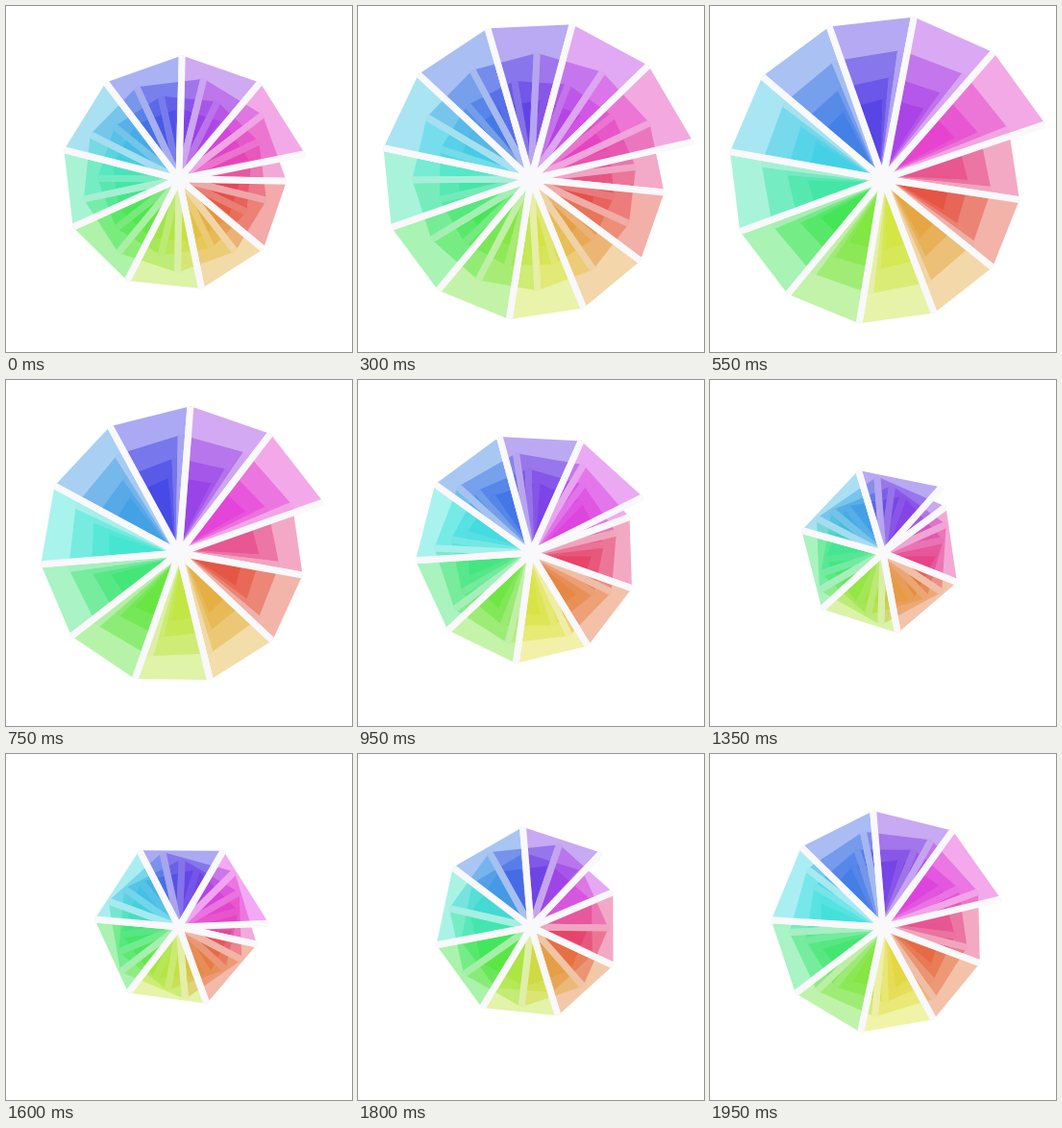
An HTML page with a canvas for the animation above (2000 ms loop, 360 by 360 pixels).

```html
<!DOCTYPE html>
<html>
<head>
<meta charset="utf-8">
<style>
html, body { margin: 0; width: 100%; height: 100%; overflow: hidden; background: #fff; }
canvas { display: block; }
</style>
</head>
<body>
<canvas id="stage" width="360" height="360"></canvas>
<script>
const ctx = document.getElementById('stage').getContext('2d');
const LOOP = 2000, TICK = 50, TURNS = 4, GROWTH = 1.02;

function draw(tick) {
  const wave = Math.sin(0.106 + 0.1569 * tick);
  const perTurn = 9.006 + 3 * wave;
  const count = Math.floor(TURNS * perTurn);
  const step = 360 / perTurn;
  const base = 63.5 + 7.1 * wave;

  const corner = i => {
    const a = i * step * Math.PI / 180, r = base * GROWTH ** i;
    return [r * Math.cos(a), r * Math.sin(a)];
  };

  ctx.setTransform(1, 0, 0, 1, 0, 0);
  ctx.fillStyle = '#fff';
  ctx.fillRect(0, 0, 360, 360);
  ctx.translate(180, 180);
  ctx.strokeStyle = '#f9f8fa';
  ctx.lineWidth = 7;

  // Later wedges lie over earlier, smaller turns of the spiral.
  for (let i = 0; i < count; i++) {
    ctx.beginPath();
    ctx.moveTo(...corner(i));
    ctx.lineTo(0, 0);
    ctx.lineTo(...corner(i + 1));
    ctx.fillStyle = `hsla(${i * step % 360}, 75%, 52%, 0.4)`;
    ctx.fill();
    ctx.stroke();
  }
}

const start = performance.now();
function frame() {
  const ms = (performance.now() - start) % LOOP;
  draw(Math.floor(ms / TICK));
  requestAnimationFrame(frame);
}
frame();
</script>
</body>
</html>
```
